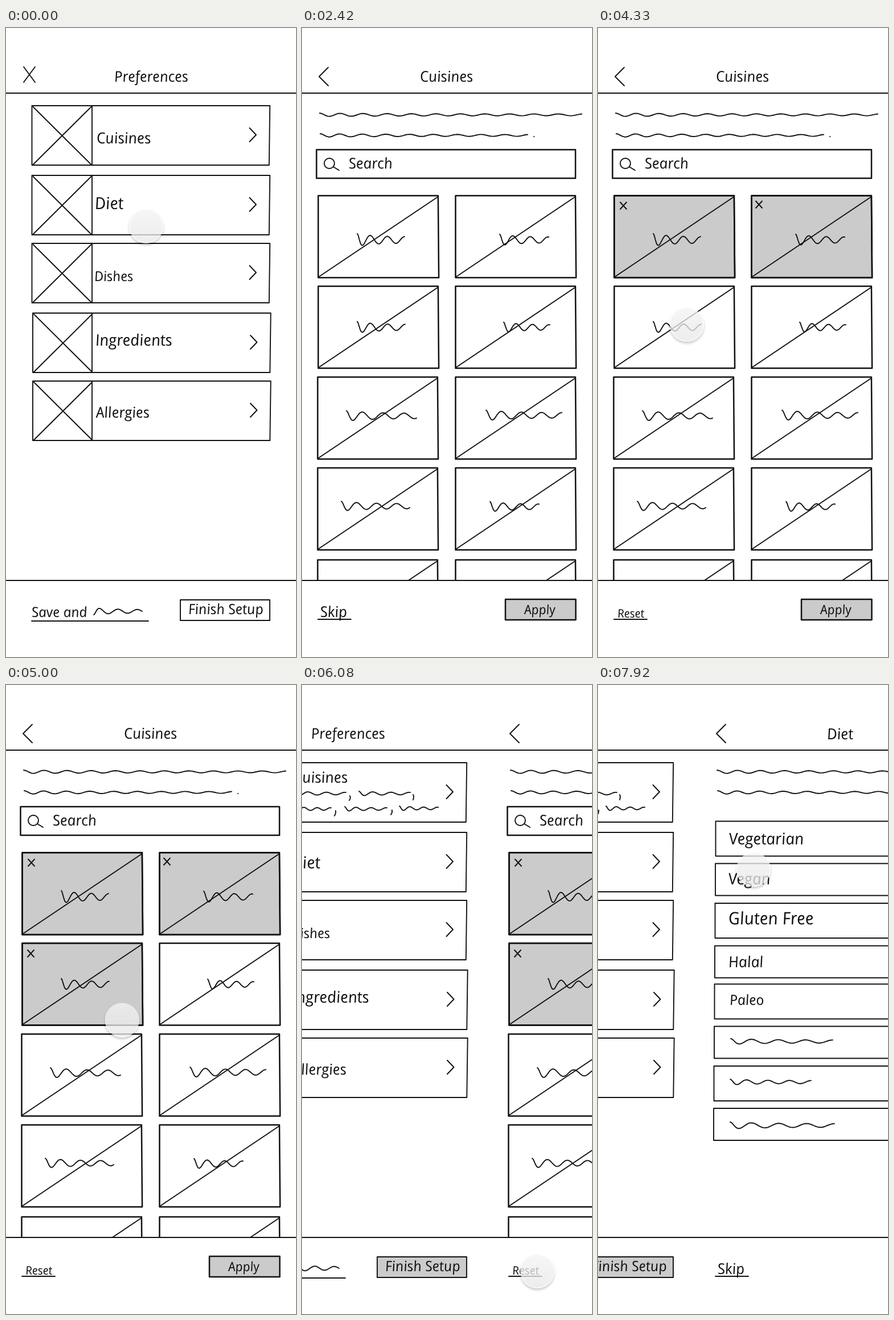
Animation of 509 by 1101 pixels, one loop 8000 ms. Source, as an HTML page:

```html
<!DOCTYPE html>
<html lang="en">
<head>
<meta charset="utf-8">
<title>Preferences wireframe</title>
<style>
html, body { margin: 0; width: 100%; height: 100%; overflow: hidden; background: #fff; }
svg { position: absolute; left: 0; top: 0; }
text { font-family: "Open Sans", "Noto Sans", sans-serif; font-style: italic; fill: #111; }
path, rect, circle { fill: none; stroke: #111; stroke-width: 1.9; stroke-linecap: round; stroke-linejoin: round; }
.bold { stroke-width: 2.5; }
.gray { fill: #cbcbcb; }
.page { fill: #fff; stroke: none; }
#touch {
  position: absolute; left: -30px; top: -30px; width: 60px; height: 60px;
  box-sizing: border-box; border: 1.5px solid rgba(255,255,255,.8); border-radius: 50%;
  background: linear-gradient(rgba(243,243,243,.76), rgba(232,232,232,.78)) padding-box;
  box-shadow: 0 3px 4px rgba(0,0,0,.22);
}
</style>
</head>
<body>
<svg width="509" height="1101" viewBox="0 0 509 1101">
  <g id="prefs"></g><g id="cuisines"></g><g id="diet"></g>
</svg>
<div id="touch"></div>
<script>
const $ = id => document.getElementById(id);
const path = (d, cls = "") => `<path class="${cls}" d="${d}"/>`;
// A box whose right edge leans a little, as if ruled by hand.
const box = (x, y, x2, y2, cls = "", lean = 0) =>
  path(`M${x} ${y}L${x2 + lean} ${y}L${x2 - lean} ${y2}L${x} ${y2}Z`, cls);
// The italic letterforms are set nearly upright to look like print handwriting.
const label = (str, x, y, size) =>
  `<text transform="translate(${x} ${y}) skewX(9)" font-size="${size}">${str}</text>`;
const cross = (x, y, w, h = w) => path(`M${x} ${y}l${w} ${h}m0 ${-h}l${-w} ${h}`);
const show = (id, on) => $(id).setAttribute("visibility", on ? "visible" : "hidden");

// Scribble with a quick first downstroke that settles along its length.
function wave(x, x2, y, amp, cycles) {
  let d = "";
  for (let i = 0; i <= 100; i++) {
    const u = i / 100;
    const turn = cycles * u + .25 * (1 - Math.exp(-15 * u));
    const v = y - amp * (.5 + .5 * Math.exp(-3 * u)) * Math.cos(2 * Math.PI * turn);
    d += (i ? "L" : "M") + (x + (x2 - x) * u).toFixed(1) + " " + v.toFixed(1);
  }
  return path(d);
}

const page = box(0, 0, 509, 1101, "page") + path("M0 114H509");
const footer = box(0, 967, 509, 1101, "page") + path("M0 967H509");
const back = path("M46 69L30 85L46 101");
const intro = wave(31, 491, 152, 3, 10.7) + wave(32, 396, 188, 3, 8.7) + path("M407 190h.3");
const skip = label("Skip", 33, 1031, 26);
const underline = path("M28 1035H86");

function drawPrefs() {
  const rows = [136, 258, 377, 499, 618].map((y, i) => {
    const x = i > 2 ? 47 : 45.5;
    return box(x, y, x + 417, y + 104, "", .7) + path(`M151 ${y}v104`) +
      cross(x + 2, y + 2, 102, 101) + path(`M${x + 382} ${y + 39}l11.5 12l-11.5 12`);
  }).join("");
  const before = label("Cuisines", 160, 202, 26.6) + label("Diet", 157, 317, 29);
  const after = label("Cuisines", 160, 171, 26.6) + label("Diet", 157, 321, 29) +
    wave(160, 251, 190, 4, 2.8) + wave(274, 364, 190, 4, 2.8) +
    wave(160, 225, 217, 4, 2.8) + wave(249, 323, 217, 4, 2.8) + wave(345, 413, 216, 4, 2.8) +
    path("M258 194q2 4 -1 8M369 192q2 4 0 9M233 220q1 4 -2 9M332 219q1 4 -2 8");
  return page + rows +
    label("Dishes", 156, 443, 24) + label("Ingredients", 158, 556, 27.7) +
    label("Allergies", 159, 682, 26) +
    `<g id="before">${before}</g><g id="after">${after}</g>` +
    cross(31, 68, 20, 27) + label("Preferences", 191, 94, 25.7) + footer +
    label("Save and", 46, 1031, 24.4) + wave(154, 239, 1021, -6, 2.5) + path("M45 1038H250") +
    `<g id="finish">${box(306, 1001, 463, 1037)}</g>` + label("Finish Setup", 321, 1026, 24.9);
}

function drawCuisines() {
  const scribbles = [
    [97, 180, 371, 11, 2.75], [347, 433, 371, 10, 2.8],
    [97, 181, 524, 10, 2.75], [354, 435, 524, 9, 2.8],
    [78, 201, 679, 9, 3.35], [323, 456, 678, 9, 3.75],
    [69, 189, 837, 8.5, 3.4], [330, 416, 838, 9, 2.8]
  ];
  const marks = [[39, 305], [277, 303], [38, 464]];
  let tiles = "";
  for (let i = 0; i < 10; i++) {
    const x = i % 2 ? 269.5 : i > 3 ? 27.5 : 28.5;
    const y = [293.5, 452, 611, 770, 931][i >> 1];
    const edge = [x, y, x + 211, y + 143.5];
    if (marks[i]) tiles += `<g id="pick${i}">${box(...edge, "bold gray", -.6)}${cross(...marks[i], 11, 12)}</g>`;
    tiles += box(...edge, "bold", -.6) + path(`M${x + 1} ${y + 142}l209 -140`);
    if (scribbles[i]) tiles += wave(...scribbles[i]);
  }
  return page + back + label("Cuisines", 208, 94, 26) + intro +
    box(25.5, 213, 480, 263, "bold") +
    `<circle cx="48" cy="237" r="9"/>` + path("M55 243L65 249") +
    label("Search", 83, 246, 26) + tiles + footer +
    `<g id="skip">${skip}</g><g id="reset">${label("Reset", 35, 1032, 20.5)}</g>` + underline +
    box(357, 1000, 480.5, 1036, "bold gray") + label("Apply", 391, 1026, 22.5);
}

function drawDiet() {
  const tops = [238.5, 312.5, 382, 456.5, 523.5, 597.5, 667, 741];
  const rows = tops.map((y, i) => box(28.5 - i / 2, y, 480, y + (i % 2 ? 56 : 61))).join("");
  return page + back + label("Diet", 225, 95, 26.5) + intro + rows +
    label("Vegetarian", 53, 279, 28) + label("Vegan", 52, 349, 27.7) +
    label("Gluten Free", 52, 419, 30) + label("Halal", 52, 494, 26.5) +
    label("Paleo", 54, 560, 24.8) +
    wave(55, 234, 624, 5, 3.75) + wave(54, 196, 695, 5, 3.75) + wave(54, 237, 771, 6, 3.75) +
    footer + skip + underline;
}

$("prefs").innerHTML = drawPrefs();
$("cuisines").innerHTML = drawCuisines();
$("diet").innerHTML = drawDiet();

// Touch moves: first tick, last tick, end point.
const moves = [
  [0, 8, 237, 180], [18, 24, 145, 415], [31, 39, 348, 385],
  [44, 52, 156, 519], [57, 67, 413, 1026], [80, 90, 273, 323]
];
const picks = [30, 43, 55];

function touchAt(tick) {
  let x = 246, y = 347;
  for (const [from, to, x2, y2] of moves) {
    if (tick <= from) break;
    const u = Math.min(1, (tick - from) / (to - from));
    const a = u ** 2.1, e = a / (a + (1 - u) ** 2.1);
    const dx = x2 - x, dy = y2 - y, bow = .17 * e * (1 - e);
    x += dx * e + dy * bow;
    y += dy * e - dx * bow;
  }
  return [x, y];
}

function place(id, x) {
  $(id).setAttribute("transform", `translate(${x})`);
}

function draw(ms) {
  const tick = Math.floor((ms % 8000 + 4) * 12 / 1000) % 96; // 12 pictures a second
  const cuisinesX = tick < 10 ? 509 : tick === 10 ? 140 : tick < 73 ? 0 : tick === 73 ? 335 : 509;
  const dietX = tick < 95 ? 509 : 178;
  place("cuisines", cuisinesX);
  place("diet", dietX);
  place("prefs", tick < 11 ? 0 : Math.min(cuisinesX, dietX) - 509);

  const chosen = tick >= 30, applied = tick >= 73;
  show("skip", !chosen);
  show("reset", chosen);
  show("before", !applied);
  show("after", applied);
  $("finish").firstChild.setAttribute("class", applied ? "gray" : "");
  picks.forEach((at, i) => show("pick" + i, tick >= at));

  const [x, y] = touchAt(tick);
  $("touch").style.transform = `translate(${x}px, ${y}px)`;
  $("touch").style.visibility = picks.includes(tick + 1) ? "hidden" : "visible";
}

const start = performance.now();
function loop() {
  draw(performance.now() - start);
  requestAnimationFrame(loop);
}
loop();
</script>
</body>
</html>
```
